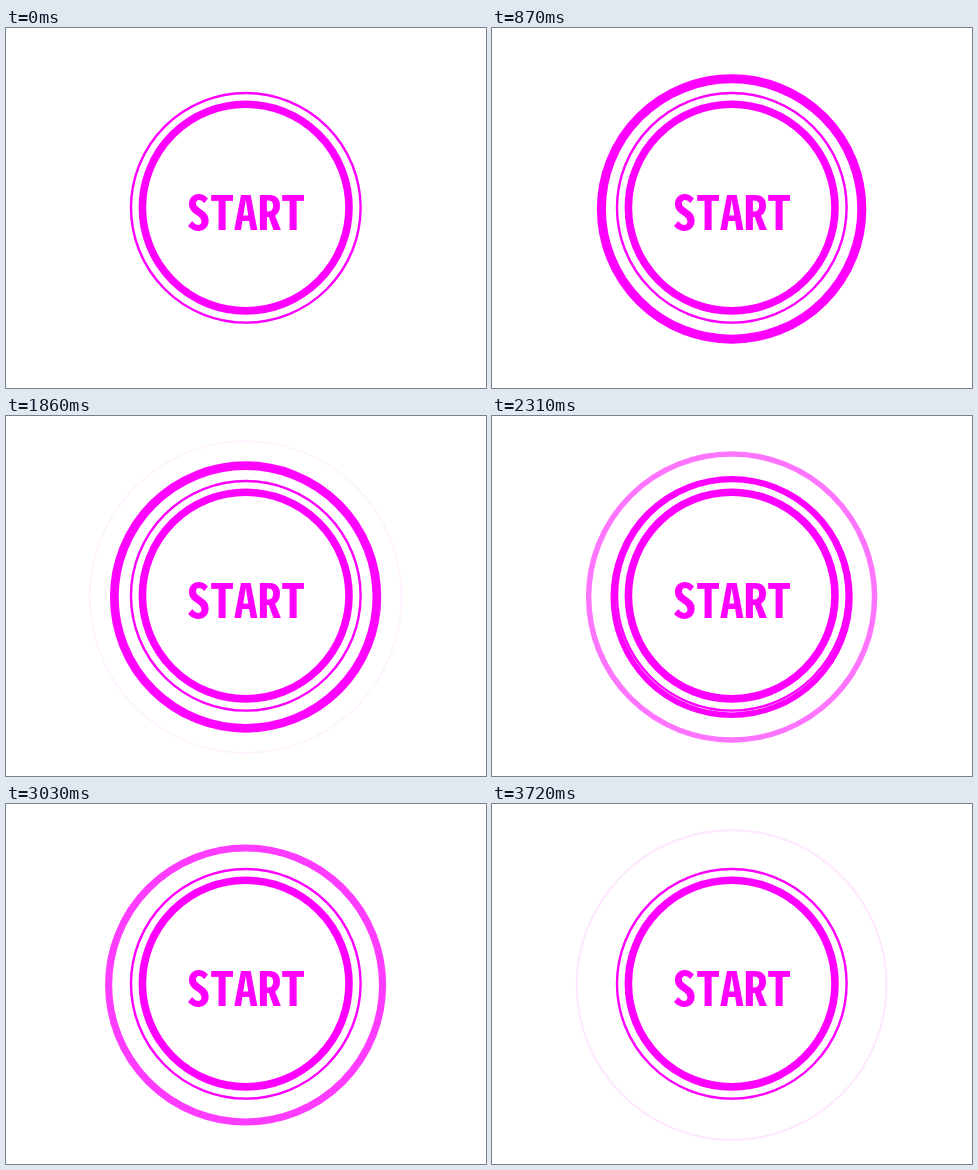
Recreate the animation shown at these times as an HTML page. Size 480 px wide and 360 px high, loop 4320 ms.

```html
<!DOCTYPE html>
<html>
<head>
<meta charset="utf-8">
<style>
  html, body { margin: 0; width: 100%; height: 100%; overflow: hidden; background: #fff; }
  svg { display: block; width: 480px; height: 360px; }
  circle { fill: none; stroke: #f0f; }
  text {
    fill: #f0f; text-anchor: middle;
    font: 700 47.4px "Noto Sans Mono CJK JP", "Noto Sans Mono CJK SC", "Noto Sans CJK JP", sans-serif;
  }
</style>
</head>
<body>
<svg viewBox="0 0 480 360">
  <g id="pulses">
    <circle cx="239.6" cy="181"/>
    <circle cx="239.6" cy="181"/>
    <circle cx="239.6" cy="181"/>
  </g>
  <circle cx="239.8" cy="179.8" r="114.8" stroke-width="2.4"/>
  <circle cx="239.7" cy="179.6" r="103.3" stroke-width="7.6"/>
  <text x="239.8" y="201.5">START</text>
</svg>
<script>
const LOOP = 4320, STEP = 30, LAST = 3720;
const SPACING = 950, LIFE = 1870, PEAK = 520;
const pulses = [...document.querySelectorAll('#pulses circle')];

// Stroke swells while the ring leaves the button, then thins out.
const strokeWidth = age => age < PEAK
  ? 11.6 * (age / PEAK) ** 3
  : 11.6 - 0.0073 * (age - PEAK);

function drawPulse(ring, age) {
  const alive = age > 0 && age < LIFE;
  ring.style.display = alive ? '' : 'none';
  if (!alive) return;
  ring.setAttribute('r', 107.6 + 0.026 * age);
  ring.setAttribute('stroke-width', strokeWidth(age));
  ring.setAttribute('opacity', Math.min(1, (1915 - age) / 1025));
}

function frame() {
  const now = performance.now() % LOOP;
  const time = Math.min(LAST, Math.floor(now / STEP) * STEP);
  pulses.forEach((ring, i) => drawPulse(ring, time - i * SPACING));
  requestAnimationFrame(frame);
}
frame();
</script>
</body>
</html>
```
